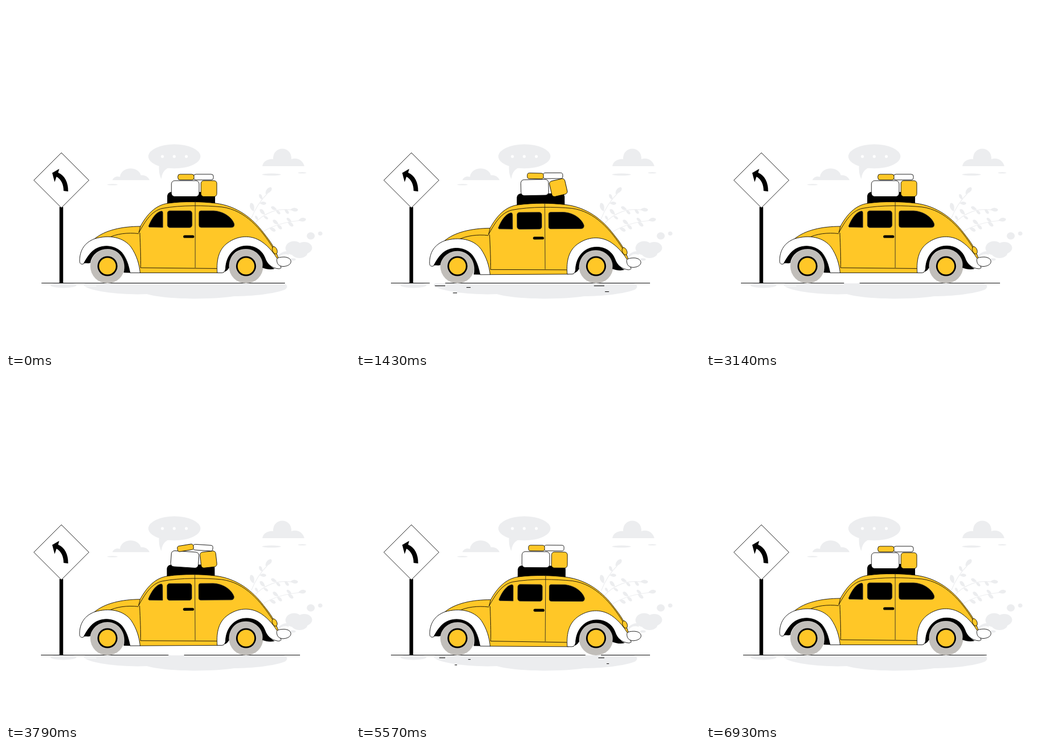
Animation of 640x640 px, one loop 7000 ms. Source, as an HTML page with a canvas:

```html
<!DOCTYPE html>
<html lang="en">
<head>
<meta charset="utf-8">
<title>Road trip</title>
<style>
html, body { margin: 0; width: 100%; height: 100%; overflow: hidden; background: #fff; }
canvas { display: block; width: 100vw; height: 100vh; }
</style>
</head>
<body>
<canvas id="stage" width="640" height="640"></canvas>
<script>
const ctx = document.getElementById('stage').getContext('2d');
const YELLOW = '#ffc727', PALE = '#ecedef', TIRE = '#c1beba', BLACK = '#000', WHITE = '#fff';
const LOOP = 7000, HOP = 387, DRIFT = 3870;
const GROUND = { left: 65, right: 547, gap: 29, speed: 0.07 };

function shape(d, fill, stroke, width = 0.9) {
  const p = typeof d === 'string' ? new Path2D(d) : d;
  if (fill) { ctx.fillStyle = fill; ctx.fill(p); }
  if (stroke) { ctx.strokeStyle = stroke; ctx.lineWidth = width; ctx.stroke(p); }
}

function oval(x, y, rx, ry, fill, stroke, tilt = 0) {
  const p = new Path2D();
  p.ellipse(x, y, rx, ry, tilt, 0, 7);
  shape(p, fill, stroke);
}

function box(x, y, w, h, r, fill, stroke) {
  const p = new Path2D();
  p.roundRect(x, y, w, h, r);
  shape(p, fill, stroke);
}

function rule(x1, x2, y, width = 1, color = BLACK) {
  if (x2 <= x1) return;
  ctx.fillStyle = color;
  ctx.fillRect(x1, y - width / 2, x2 - x1, width);
}

// Linear interpolation through [position, value] pairs
function track(p, keys) {
  for (let i = 1; i < keys.length; i++) {
    const [a, va] = keys[i - 1], [b, vb] = keys[i];
    if (p <= b) return va + (vb - va) * (p - a) / (b - a);
  }
  return keys[keys.length - 1][1];
}

function leaf(x, y, angle, size) {
  ctx.save();
  ctx.translate(x, y);
  ctx.rotate(angle * Math.PI / 180);
  ctx.scale(size, size);
  shape('M0 0 C3 -4 9 -6 14 -2 C15 2 9 5 0 0Z', PALE);
  ctx.restore();
}

function plant() {
  shape('M456 396 C463 378 473 362 487 348', null, PALE, 1.1);
  shape('M461 406 C480 384 507 375 534 380', null, PALE, 1.1);
  shape('M478 420 C500 406 525 401 548 399', null, PALE, 1.1);
  [
    [483, 350, -45, 1.15], [477, 360, -115, 0.8], [472, 367, 5, 0.85], [461, 382, -105, 1.15],
    [529, 379, 5, 1], [518, 378, 50, 0.8], [504, 379, -150, 0.85], [502, 380, 45, 0.75],
    [482, 388, -130, 0.95], [479, 391, 35, 0.7], [469, 398, -120, 0.65],
    [544, 399, -5, 1], [531, 401, -140, 0.75], [524, 402, 40, 0.9],
    [507, 406, -140, 0.9], [504, 407, 45, 0.85], [490, 413, 30, 0.9]
  ].forEach(a => leaf(...a));
}

function backdrop() {
  shape('M198 324 C200 318 206 316 212 318 C214 298 246 297 251 315 C258 314 265 318 267 324Z', PALE);
  oval(198, 332.3, 10, 1.2, PALE);
  shape('M477 298 C478 289 488 284 497 285 C496 259 532 259 531 285 C542 281 553 288 555 298Z', PALE);
  oval(494, 313.6, 17.5, 2, PALE);
  oval(551, 310.3, 8, 1.2, PALE);

  oval(313.3, 279.8, 48.5, 22.5, PALE);
  shape('M285 296 C284 305 285 314 289 322 C290 312 294 304 303 301Z', PALE);
  [291, 313, 335.5].forEach(x => oval(x, 280, 2.7, 2.7, WHITE));

  plant();
  oval(536, 450.5, 16, 13, PALE);
  oval(555, 450, 14.5, 11, PALE);
  oval(546, 459, 15, 10, PALE);
  oval(534, 471.5, 5, 2.2, PALE);
  oval(567, 427.7, 7.5, 6.8, PALE);
  oval(584.6, 423.2, 4, 3.8, PALE);
  shape('M504 468 C509 459 516 456 526 456 L526 463 C517 460 511 463 506 470Z', PALE);

  oval(107, 519.5, 24, 5, PALE);
  shape('M150 516 H515 C525 517 525 525 518 528 C500 535 460 540 424 540 C390 546 300 547 262 536 ' +
    'C220 538 160 532 146 521 C143 518 146 516 150 516Z', PALE);
  rule(143, 168, 521, 1, WHITE);
}

function sign() {
  ctx.fillStyle = BLACK;
  ctx.fillRect(99.5, 374, 6.8, 142);
  shape('M103 273 L154.2 324.2 L103 375.4 L51.8 324.2Z', WHITE, BLACK);
  shape('M86 310.5 L99 303 L97 310 C109 315 116 328 115.6 345 L107.2 344 C107 332 103 323 94 317.5 L90.5 327.5Z', BLACK);
}

function ground(t) {
  const { left, right, gap, speed } = GROUND, span = right - left;
  const start = 37 + speed * t;
  for (let x = start - 2 * span; x < right; x += span) {
    rule(Math.max(left, x + gap), Math.min(right, x + span), 515.5);
  }
}

function streaks(t) {
  const p = t % DRIFT;
  const head = Math.min(1, p / 1000), tail = track(p, [[0, 0], [970, 0], [2075, 1]]);
  [[133, 33, 520.6], [200, 13.2, 523.6], [175, 13, 533.8], [429, 33, 520.6], [458, 12.6, 531.5]]
    .forEach(([x, len, y]) => rule(x + len * tail, x + len * head, y, 1.1));
}

function wheel(x) {
  oval(x, 484, 32, 32, TIRE);
  oval(x, 484, 18.6, 18.6, BLACK);
  oval(x, 484, 15.6, 15.6, YELLOW);
}

function bag(x, y, w, h, r, fill, dx, dy, deg) {
  ctx.save();
  ctx.translate(x + w / 2 + dx, y + h / 2 + dy);
  ctx.rotate(deg * Math.PI / 180);
  box(-w / 2, -h / 2, w, h, r, fill, BLACK);
  ctx.restore();
}

function luggage(p) {
  const lift = -5 * track(p, [[0, 0], [.12, 0], [.27, 1], [.4, 1], [.53, 0], [.58, 0], [.69, 1], [.793, .72], [.9, 0]]);
  const swing = (peak, late) => track(p, [[0, 0], [.58, 0], [.69, peak], [.793, late], [.9, 0]]);
  shape('M300 368 V353 Q301 347 307 346 H385 Q389 348 389 353 V368Z', BLACK);
  bag(307.8, 325, 51.4, 29.5, 6, WHITE, 0, lift, swing(-1, 4));
  bag(362.8, 325, 29.4, 29.5, 5, YELLOW, 0, lift * .9, swing(-13, -6));
  bag(349.2, 313, 36.6, 10.6, 4, WHITE, 0, lift * 1.05, swing(0, 4));
  bag(319.8, 313, 30, 10.6, 4, YELLOW, 0, lift, swing(2, -9));
}

function shell() {
  shape('M165 433 C184 417 216 410 250 410 C262 388 278 370 302 367 C332 363 365 364 390 367 ' +
    'C430 372 459 395 480 423 C491 437 502 451 508 474 L470 490 L393 496.4 H249 L233 450Z', YELLOW, BLACK);
  shape('M191 431 C205 424 226 421 247 423.5', null, BLACK);
  shape('M250 410 L247 422 C259 400 271 381 291 376.5 C325 370 372 371 402 374 C446 380 475 416 496 449', null, BLACK);
  shape('M249 422 C250 448 251 470 250.5 487 L392 488.4', null, BLACK);
  shape('M352 363 V487', null, '#222', 0.9);

  const edge = '#37332a';
  shape('M265.5 409 C271 395 280 383 289 381.6 Q291.8 381.5 291.8 385 V412 L267 411.5 Q265 411 265.5 409Z', BLACK, edge);
  box(300.3, 381, 45.8, 31.2, 4.5, BLACK, edge);
  shape('M362.5 381 H386 C406 382 421 394 424.7 406 Q425 412 419 412 H363 Q359 412 359 408 V385 Q359 381 362.5 381Z', BLACK, edge);
  box(329.8, 426.4, 20.4, 5.2, 2.6, BLACK);
}

function arches() {
  // Dark crescents between fender and tyre
  shape('M142 480 C152 458 165 445 187 444 C212 445 224 466 232 496.4 L219 496 ' +
    'C225 474 211 452 189 452 C172 452 159 464 157 478 C152 480 148 477 142 480Z', BLACK);
  shape('M405 494 C409 464 422 445 447 444 C472 444 480 458 484 470 C488 481 494 486 500 489 ' +
    'C492 491 485 490 477 487 C481 470 466 452 446.5 452 C425 452 414 469 415 487 C412 492 408 495 405 494Z', BLACK);
}

function fenders() {
  shape('M137 474 C137 455 146 440 165 433 C192 425 219 430 233 449 C243 464 248 480 249.5 496.4 H231 ' +
    'C228 484 226 472 216 459 C201 443 175 443 160 457 C152 465 148 473 144 480 C139 481 137 479 137 474Z', WHITE, BLACK);
  shape('M393 496.4 C391 470 397 452 412 441 C431 427 455 425 475 438 C490 448 500 462 507 474 L512 487 ' +
    'Q509 490 504 488.5 C493 486 486 480 482 469 C475 450 456 444 440 447 C420 451 409 469 408.5 489 Q407 496 402 496.4Z', WHITE, BLACK);
  oval(500, 454.5, 4.2, 7.2, YELLOW, BLACK, -0.4);
  shape('M503.8 473 C503 468 510 467 518 467 C534.5 468 534.5 483.5 516 484.6 C508 484.4 504 480 503.8 473Z', WHITE, BLACK);
}

function car(t) {
  const p = (t % HOP) / HOP;
  const drop = 3 * track(p, [[0, 0], [.12, 0], [.27, 1], [.4, 1], [.53, 0], [.58, 0], [.69, 1], [.793, .46], [.88, 0]]);
  const tilt = 0.0061 * track(p, [[0, 0], [.12, 0], [.27, 1], [.4, 1], [.53, 0], [.58, 0], [.69, -1], [.793, -.85], [.9, 0]]);
  wheel(188.8);
  wheel(446.6);
  ctx.save();
  ctx.translate(320, 500 + drop);
  ctx.rotate(tilt);
  ctx.translate(-320, -500);
  luggage(p);
  // The shell is clipped so the tyres stay visible through the arches
  ctx.save();
  const clip = new Path2D('M0 0 H640 V640 H0Z');
  clip.addPath(new Path2D('M142 500 V480 C152 458 165 445 187 444 C212 445 224 466 232 500Z'));
  clip.addPath(new Path2D('M405 500 C409 464 422 445 447 444 C472 444 480 458 484 470 L500 489 V500Z'));
  ctx.clip(clip, 'evenodd');
  shell();
  ctx.restore();
  arches();
  fenders();
  ctx.restore();
}

function draw(now) {
  const t = now % LOOP;
  ctx.fillStyle = WHITE;
  ctx.fillRect(0, 0, 640, 640);
  backdrop();
  sign();
  ground(t);
  streaks(t);
  car(t);
}

let origin;
function tick(now) {
  if (origin === undefined) origin = now;
  draw(now - origin);
  requestAnimationFrame(tick);
}
draw(0);
requestAnimationFrame(tick);
</script>
</body>
</html>
```
